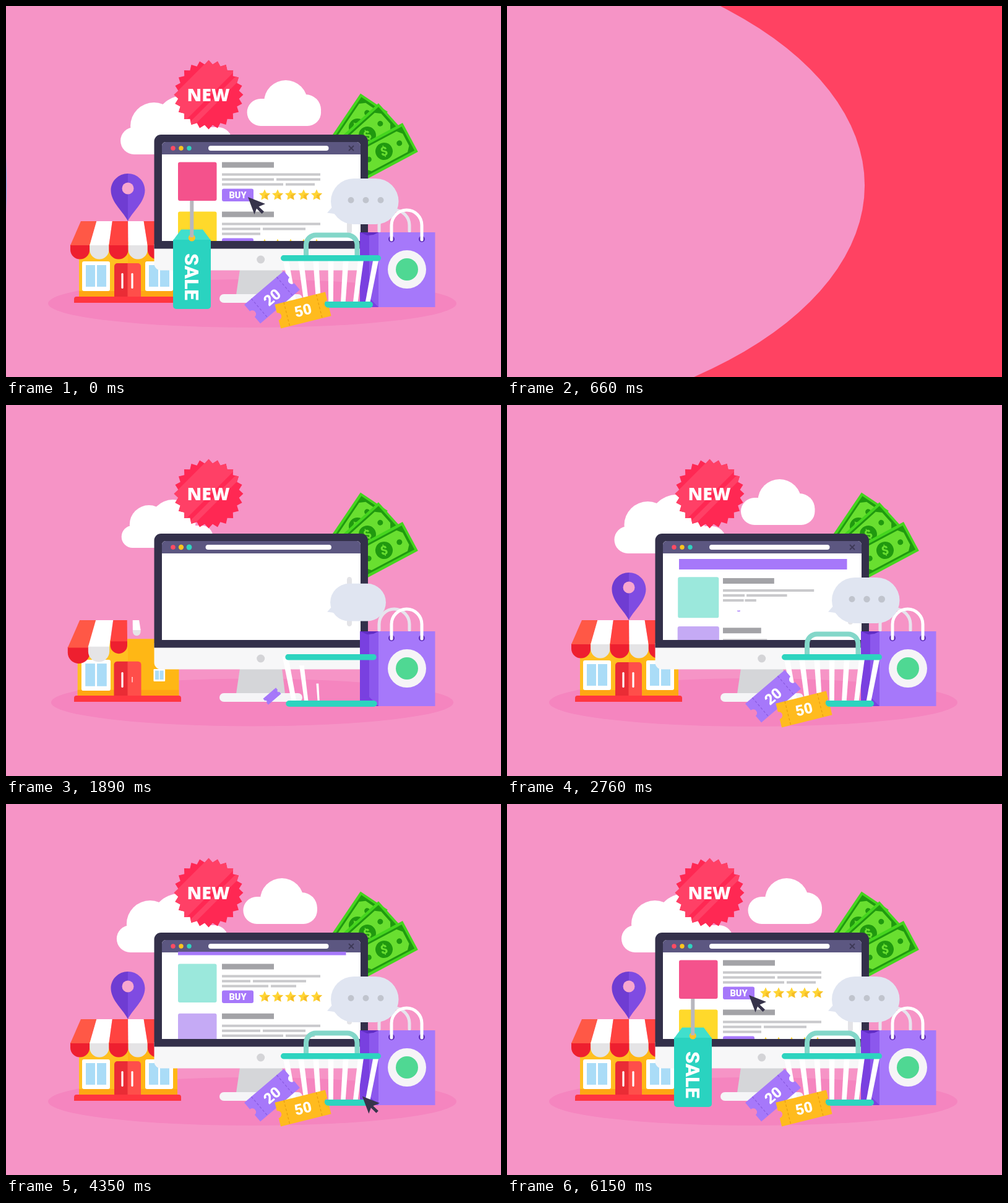
Write an HTML page with a canvas that moves like this. It is 800 px wide and 600 px high and loops after 6.18 s.

```html
<!DOCTYPE html>
<html lang="en">
<head>
<meta charset="utf-8">
<title>Online shop</title>
<style>
html, body { margin: 0; width: 100%; height: 100%; overflow: hidden; background: #f694c6; }
canvas { display: block; width: 800px; height: 600px; }
</style>
</head>
<body>
<canvas width="800" height="600"></canvas>
<script>
const g = document.querySelector('canvas').getContext('2d');
const LOOP = 6180, PINK = '#f694c6', TEAL = '#2dd4bf', PURPLE = '#a678fa';
let t = 0;

// --- timing ---
const clamp = u => Math.max(0, Math.min(1, u));
const span = (start, dur) => clamp((t - start) / dur);
const pop = (start, dur = 600, over = 1.7) => {
  const u = span(start, dur), v = 1 - u;
  return u ? 1 - (over + 1) * v ** 3 + over * v * v : 0;
};
const easeOut = (start, dur) => 1 - (1 - span(start, dur)) ** 3;
const inOut = (u, p) => u < .5 ? (2 * u) ** p / 2 : 1 - (2 - 2 * u) ** p / 2;

// --- drawing helpers ---
function zoom(x, y, sx, draw, sy = sx) {
  if (sx <= 0 || sy <= 0) return;
  g.save();
  g.translate(x, y); g.scale(sx, sy); g.translate(-x, -y);
  draw();
  g.restore();
}
function place(x, y, deg, s, draw) {
  if (s <= 0) return;
  g.save();
  g.translate(x, y); g.rotate(deg * Math.PI / 180); g.scale(s, s);
  draw();
  g.restore();
}
function box(x0, y0, x1, y1, color, r = 0) {
  g.fillStyle = color;
  g.beginPath(); g.roundRect(x0, y0, x1 - x0, y1 - y0, r); g.fill();
}
function disc(x, y, r, color) {
  g.fillStyle = color;
  g.beginPath(); g.arc(x, y, r, 0, 7); g.fill();
}
function trace(pts) {
  g.beginPath();
  for (let i = 0; i < pts.length; i += 2) g.lineTo(pts[i], pts[i + 1]);
}
function poly(color, ...pts) { trace(pts); g.fillStyle = color; g.fill(); }
function line(color, width, ...pts) {
  trace(pts);
  g.strokeStyle = color; g.lineWidth = width; g.stroke();
}
function label(str, x, y, size, color = '#fff', font = '900', family = 'Roboto') {
  g.font = `${font} ${size}px "${family}", sans-serif`;
  g.textAlign = 'center'; g.textBaseline = 'alphabetic';
  g.fillStyle = color;
  g.fillText(str, x, y + size * .355);
}
function starPath(x, y, n, R, r) {
  g.beginPath();
  for (let i = 0; i < 2 * n; i++) {
    const a = i * Math.PI / n - Math.PI / 2, d = i % 2 ? r : R;
    g.lineTo(x + d * Math.cos(a), y + d * Math.sin(a));
  }
  g.closePath();
}

// --- background objects ---
function ground() {
  const s = easeOut(1250, 850);
  g.fillStyle = '#f585bf';
  g.beginPath(); g.ellipse(398, 481, 330 * s, 39 * s, 0, 0, 7); g.fill();
}
function clouds() {
  g.save();
  g.translate((t - 6150) * .0034, 0);
  zoom(275, 190, pop(1740), () => {
    box(185, 196, 365, 240, '#fff', 22);
    disc(239, 194, 38, '#fff');
    disc(286, 190, 45, '#fff');
  });
  zoom(449, 160, pop(1930), () => {
    box(389.5, 150, 509, 194, '#fff', 22);
    disc(452, 155, 35, '#fff');
    disc(484, 168, 25, '#fff');
  });
  g.restore();
}
function badge() {
  zoom(327.5, 143.5, pop(834), () => {
    starPath(327.5, 143.5, 24, 56, 49.5);
    g.fillStyle = '#ff2853'; g.fill();
    g.save(); g.clip();
    poly('#ff4066', 265, 150, 355, 60, 400, 75, 275, 200);
    poly('#ff4066', 280, 205, 390, 95, 396, 101, 286, 211);
    g.restore();
  });
  zoom(327.5, 143.5, pop(876, 600, 3), () =>
    label('NEW', 327, 143.5, 28.5, '#fff', '800', 'Open Sans'));
}
function bill(x, y, deg, start) {
  place(x, y, deg, pop(start), () => {
    box(-48, -26.5, 48, 26.5, '#45d51e');
    box(-44, -22, 44, 22, '#20990f');
    poly('#69df30', -33, -19, 33, -19, 40, -11, 40, 11, 33, 19, -33, 19, -40, 11, -40, -11);
    place(0, 0, 0, pop(start + 240), () => {
      disc(0, 0, 14, '#20990f');
      disc(-28, 0, 4.5, '#20990f');
      disc(28, 0, 4.5, '#20990f');
      place(0, 0, 14, 1, () => label('$', 0, 0, 20, '#69df30'));
    });
  });
}
function money() {
  bill(568, 196, -56, 840);
  bill(584, 209, -42, 912);
  bill(611, 235, -28, 1085);
}

// --- store ---
function shopWindow(x, start) {
  zoom(x + 23, 437, pop(start), () => {
    box(x, 413, x + 45, 461, '#fff', 3);
    box(x + 6, 419, x + 21, 454, '#aadcf7');
    box(x + 24, 419, x + 39, 454, '#aadcf7');
  });
}
function stripe(k) {
  const top = 121 + 25.4 * k, x = 104 + 31.2 * k, red = k % 2 === 0;
  zoom(top + 12.7, 348, pop(1545 + 97 * k, 600, 2.1), () => {
    g.fillStyle = red ? '#ee1f2f' : '#e5e4e6';
    g.beginPath(); g.roundRect(x, 386, 31.2, 23.5, [0, 0, 15.6, 15.6]); g.fill();
    poly(red ? (k ? '#ff4340' : '#ff5846') : '#fff', top, 348, top + 25.4, 348, x + 31.2, 387, x, 387);
  });
}
function store() {
  zoom(197, 470, pop(1380), () => {
    box(118, 381, 277, 470, '#ffc021');
    box(197, 381, 277, 470, '#ffb715');
    box(118, 461, 277, 470, '#ffa613');
  });
  zoom(197, 475, pop(1290), () => box(110, 470, 283, 480, '#ff3540', [4, 4, 0, 0]));
  shopWindow(123, 1638);
  shopWindow(225, 1830);
  zoom(197, 470, pop(1370), () => {
    box(175, 416, 197, 470, '#ea2c35', [5, 0, 0, 0]);
    box(196.5, 416, 218, 470, '#ff4e4a', [0, 5, 0, 0]);
  });
  [[188, 1668], [204, 1840]].forEach(([x, start]) =>
    zoom(x, 444, pop(start), () => box(x - 1.6, 432, x + 1.6, 457, '#fff', 1.5)));
  for (let k = 0; k < 6; k++) stripe(k);
}
function pin() {
  zoom(197, 348, pop(2100), () => {
    const half = (dir, color) => {
      g.fillStyle = color;
      g.beginPath(); g.moveTo(197, 348);
      g.bezierCurveTo(197 + 6 * dir, 334, 197 + 27.5 * dir, 318, 197 + 27.5 * dir, 298);
      g.bezierCurveTo(197 + 27.5 * dir, 283, 197 + 15 * dir, 271, 197, 271);
      g.fill();
    };
    half(-1, '#6f3cd2');
    half(1, '#7f4be2');
    disc(197, 295, 9.5, '#f8a6cf');
  });
}

// --- monitor and page ---
const cards = [
  ['#9be8dc', [508], [395, 485], [424, 469]],
  ['#c5aaf5', [508], [411, 484], [448, 499]],
  ['#f4528c', [508], [433, 508], [448, 499]],
  ['#ffd92b', [508], [411, 484], [411]],
  ['#9be8dc', [508], [433, 508], [448, 499]]
];
function card([color, ...rows], y, start) {
  zoom(309, y + 31, pop(start), () => box(278, y, 340.5, y + 62.5, color, 3));
  zoom(349, y, easeOut(start + 120, 450), () => box(349, y, 433, y + 9, '#a3a3a7'), 1);
  rows.forEach((ends, i) => zoom(349, y, easeOut(start + 200 + 90 * i, 450), () => {
    let x = 349;
    for (const end of ends) {
      box(x, y + 18 + 8 * i, end, y + 22 + 8 * i, '#c9c9cc');
      x = end + 4;
    }
  }, 1));
  zoom(374.5, y + 53, pop(start + 450), () => {
    box(349, y + 43, 400, y + 63.5, PURPLE, 3);
    label('BUY', 374.5, y + 53.3, 14.5);
  });
  for (let i = 0; i < 5; i++) {
    const x = 418 + 21 * i;
    zoom(x, y + 53, pop(start + 550 + 80 * i), () => {
      starPath(x, y + 53.5, 5, 9.5, 4.6);
      g.fillStyle = '#ffd433'; g.fill();
      poly('#f6bd27', x, y + 53, x + 9, y + 50.5, x + 4.4, y + 55, x + 5.6, y + 61, x, y + 58);
    });
  }
}
function page() {
  const scroll = 188 * inOut(span(4000, 1150), 3);
  g.save();
  g.beginPath(); g.rect(252, 239, 321, 141); g.clip();
  zoom(278, 257, easeOut(2100, 600), () => box(278, 249 - scroll, 549.5, 266 - scroll, PURPLE), 1);
  cards.forEach((c, i) => card(c, 280 + 80.2 * i - scroll, 2300 + 180 * i));
  const y = 281 + scroll * .07;
  zoom(555, 318, 1, () => box(551, y, 559, y + 74, '#e3e3e7', 4), pop(1480));
  g.restore();
}
function monitor() {
  zoom(412.3, 455, pop(924), () => {
    poly('#d5d6d9', 378, 426, 446, 426, 451, 467, 372, 467);
    box(345, 466, 479, 480, '#f5f5f7', 7);
    box(239.5, 385, 585, 427.5, '#f7f7f8', [0, 0, 11, 11]);
    disc(411.7, 410, 6.5, '#d4d4d7');
    box(239.5, 208, 585, 392.5, '#33304a', [11, 11, 0, 0]);
    box(252, 220, 573, 380, '#fff', [6, 6, 0, 0]);
    box(252, 220, 573, 240, '#5c5781', [6, 6, 0, 0]);
  });
  ['#ff4b62', '#ffc51c', TEAL].forEach((color, i) =>
    zoom(270 + 13 * i, 230, pop(1350 + 100 * i, 600, 2.6), () => disc(270 + 13 * i, 230, 3.7, color)));
  zoom(424, 230, pop(1410), () => box(327, 226, 521.5, 234, '#fff', 4), 1);
  zoom(558, 230, pop(2050), () => {
    line('#3d3956', 1.8, 554, 226, 562, 234);
    line('#3d3956', 1.8, 562, 226, 554, 234);
  });
  page();
}

// --- foreground objects ---
function handle(x0, x1, top, bottom, color) {
  const r = (x1 - x0) / 2;
  g.strokeStyle = color; g.lineWidth = 5; g.lineCap = 'round';
  g.beginPath(); g.moveTo(x0, bottom);
  g.arc(x0 + r, top + r, r, Math.PI, 0);
  g.lineTo(x1, bottom); g.stroke();
  g.lineCap = 'butt';
}
function bag() {
  zoom(633, 487, pop(834), () => {
    handle(603, 652, 330, 364, '#e7e4ed');
    box(572, 366, 602.5, 487, '#7940e0');
    poly('#8c58ed', 587, 371, 602, 366, 602, 487, 587, 472);
    poly('#602dc4', 572, 366, 602, 366, 594, 370, 584, 371);
    box(602, 366, 693.5, 487, PURPLE);
    disc(623, 377, 5, '#5c2ab8');
    disc(672, 377, 5, '#5c2ab8');
    handle(623, 672, 330, 378, '#fff');
  });
  zoom(648, 426, pop(1230), () => {
    disc(648, 426, 31, '#f6f4f7');
    disc(648, 426, 18, '#4fd893');
  });
}
function bubble() {
  zoom(520, 334, pop(1740), () => {
    poly('#e0e5f1', 519, 334.5, 530, 322, 548, 344, 530, 336);
    box(525, 279, 634.5, 353, '#e0e5f1', 37);
  });
  for (let i = 0; i < 3; i++) {
    const x = 557.5 + 24 * i;
    zoom(x, 314, pop(2150 + 130 * i), () => disc(x, 314, 5, '#c0c4cd'));
  }
}
function basket() {
  zoom(526, 408, pop(2050), () => {
    g.strokeStyle = '#83d7c9'; g.lineWidth = 8;
    g.beginPath(); g.moveTo(485, 406);
    g.arcTo(485, 370.5, 500, 370.5, 16);
    g.arcTo(567.5, 370.5, 567.5, 390, 16);
    g.lineTo(567.5, 406); g.stroke();
  });
  for (let i = 0; i < 7; i++) {
    const top = 525 + (i - 3) * 24.3, low = 525 + (i - 3) * 19.8;
    zoom(low, 479, pop(1640 + 95 * i), () =>
      poly('#fff', top - 4.5, 410, top + 4.5, 410, low + 3.8, 480, low - 3.8, 480));
  }
  zoom(526, 483, pop(1540), () => box(459, 478, 593, 488, TEAL, 5), 1);
  zoom(525, 408, pop(1710), () => box(444, 403, 606, 412.5, TEAL, 4.7), 1);
}
function ticket(x, y, deg, color, crease, text, start) {
  place(x, y, deg, pop(start), () => {
    g.fillStyle = color;
    g.beginPath(); g.moveTo(-42, -20); g.lineTo(42, -20); g.lineTo(42, -6);
    g.arc(42, 0, 6, -Math.PI / 2, Math.PI / 2, true);
    g.lineTo(42, 20); g.lineTo(-42, 20); g.lineTo(-42, 6);
    g.arc(-42, 0, 6, Math.PI / 2, -Math.PI / 2, true);
    g.fill();
    g.setLineDash([4, 3]);
    line(crease, 1.2, -27, -20, -27, 20);
    line(crease, 1.2, 27, -20, 27, 20);
    g.setLineDash([]);
    place(0, 0, 0, pop(start + 200), () => label(text, 0, 0, 24));
  });
}
function tag() {
  zoom(300.5, 315, pop(5230, 800, 1.5), () => {
    poly('#40dfcd', 270, 379, 283, 361.5, 318, 361.5, 331, 379);
    box(270, 378, 331, 490, '#2ad3c0', [0, 0, 5, 5]);
    disc(300.3, 375, 5.5, '#ffc327');
    line('#b8b7be', 6, 300.3, 315, 300.3, 374);
    place(300, 438, 90, 1, () => label('SALE', 0, 0, 31.5));
  });
}
function cursor() {
  const p = inOut(span(4020, 1330), 2);
  const press = 1 - .15 * Math.sin(Math.PI * span(5330, 220));
  place(602 - 211 * p, 496 - 187 * p, 0, easeOut(4020, 250) * press, () =>
    poly('#37344b', 0, 0, 28, 11, 17.5, 15.5, 26, 23.5, 22.5, 27, 14, 18.5, 10.5, 28));
}

function scene(time) {
  t = time;
  g.fillStyle = PINK; g.fillRect(0, 0, 800, 600);
  ground(); clouds(); badge(); money();
  store(); pin(); monitor();
  bag(); bubble(); basket();
  ticket(430, 471, -40.5, PURPLE, '#8a5be0', '20', 1845);
  ticket(480, 492, -14, '#ffbb1e', '#e79d10', '50', 1990);
  tag(); cursor();
}

// Ellipse stretching in from beyond the left edge
function wave(time, start) {
  const tip = 397 * (Math.max(0, time - start) / 150) ** 2;
  g.beginPath();
  if (tip > 0) g.ellipse(-172, 290, 172 + tip, 400, 0, 0, 7);
}
function render(time) {
  if (time > 780) return scene(time);
  scene(LOOP + time);
  [['#82a0e4', -7], ['#fff', 120], ['#ff4262', 240]].forEach(([color, start]) => {
    wave(time, start);
    g.fillStyle = color; g.fill();
  });
  if (time <= 480) return;
  g.save();
  wave(time, 480); g.clip();
  scene(time);
  g.restore();
}
const begin = performance.now();
function tick() {
  render((performance.now() - begin) % LOOP);
  requestAnimationFrame(tick);
}
tick();
</script>
</body>
</html>
```
